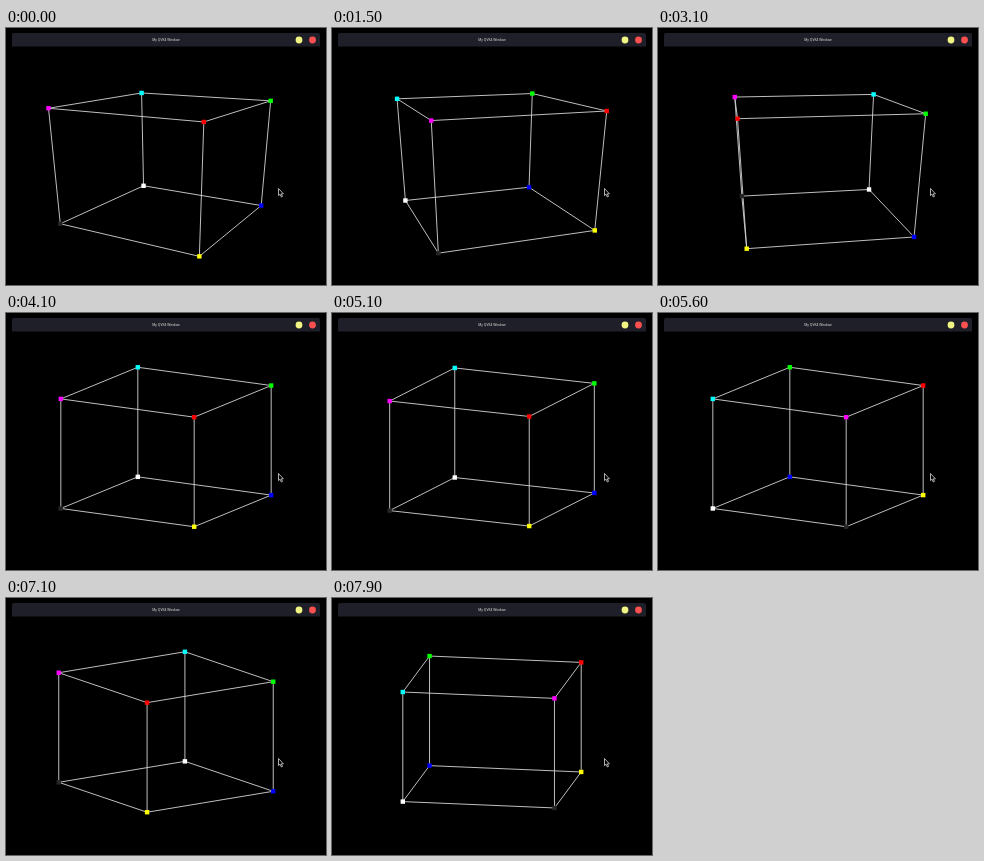
Animation of 320 by 257 pixels, one loop 8 s. Source, as an HTML page:

```html
<!DOCTYPE html>
<html lang="en">
<head>
<meta charset="utf-8">
<title>Rotating cube</title>
<style>
  html, body { margin: 0; width: 100%; height: 100%; overflow: hidden; background: #000; }
  svg { display: block; width: 100%; height: 100%; }
  text { font: 3.3px "Noto Sans", "Open Sans", sans-serif; fill: #e4e4e0; text-anchor: middle; }
</style>
</head>
<body>
<svg viewBox="0 0 320 257">
  <path d="M6 18.5V7q0-2 2-2H312q2 0 2 2V18.5z" fill="#1f1f29"/>
  <text x="160" y="13.2">My QVK4 Window</text>
  <circle cx="293" cy="12" r="3.4" fill="#f1f584"/>
  <circle cx="306.5" cy="12" r="3.4" fill="#ff5050"/>
  <path id="edges" fill="none" stroke="#d4d4d4" stroke-width=".9"/>
  <g id="corners"></g>
  <path d="M272.5 160.5V167.6L274.1 166.2L275.3 169L276.5 168.4L275.3 165.8H277.4z"
        fill="#000" stroke="#d8d8d8" stroke-width=".8"/>
</svg>
<script>
const LOOP = 8000, TICK = 100;
const ORTHO_FROM = 4100;
const START_ANGLE = 75, STEP = 5;
const KEY_DELAY = 500, KEY_PERIOD = 30.3;
const HOLDS = [[753, 3400], [4603, LOOP]];

// Window centre and half size; the camera sits at (0, 1, 3) and looks at the origin.
const CX = 160, CY = 134, HALF_W = 154, HALF_H = 115.5;
const DIST = Math.sqrt(10), SIN = 1 / DIST, COS = 3 / DIST;

// Top ring, then bottom ring.
const COLORS = ['#ff0000', '#ff00ff', '#00ffff', '#00ff00',
                '#ffff00', '#262626', '#ffffff', '#0000ff'];
const SIZE = 4.4;

const edges = document.getElementById('edges');
const corners = document.getElementById('corners');
const dots = COLORS.map(color => {
  const dot = document.createElementNS('http://www.w3.org/2000/svg', 'rect');
  dot.setAttribute('width', SIZE);
  dot.setAttribute('height', SIZE);
  dot.setAttribute('fill', color);
  return corners.appendChild(dot);
});

// A held key fires once, then repeats after a delay.
function keyEvents(t, [press, release]) {
  const held = Math.min(t, release) - press;
  if (held < 0) return 0;
  return held < KEY_DELAY ? 1 : 2 + Math.floor((held - KEY_DELAY) / KEY_PERIOD);
}

function project(i, angle, ortho) {
  const a = (angle + (i % 4) * 90) * Math.PI / 180;
  const x = Math.SQRT1_2 * Math.cos(a);
  const z = Math.SQRT1_2 * Math.sin(a);
  const y = i < 4 ? 0.5 : -0.5;
  const scale = ortho ? 1 : DIST / (DIST - y * SIN - z * COS);
  return [CX + HALF_W * x * scale, CY - HALF_H * (y * COS - z * SIN) * scale];
}

function draw(t) {
  const events = HOLDS.reduce((sum, hold) => sum + keyEvents(t, hold), 0);
  const angle = START_ANGLE - STEP * events;
  const points = COLORS.map((_, i) => project(i, angle, t >= ORTHO_FROM));
  const line = (a, b) => `M${points[a]}L${points[b]}`;
  let d = '';
  for (let i = 0; i < 4; i++) {
    const next = (i + 1) % 4;
    d += line(i, next) + line(i + 4, next + 4) + line(i, i + 4);
  }
  edges.setAttribute('d', d);
  points.forEach(([x, y], i) => {
    dots[i].setAttribute('x', x - SIZE / 2);
    dots[i].setAttribute('y', y - SIZE / 2);
  });
}

const start = performance.now();
function frame() {
  const t = (performance.now() - start) % LOOP;
  draw(Math.floor(t / TICK) * TICK);
  requestAnimationFrame(frame);
}
draw(0);
requestAnimationFrame(frame);
</script>
</body>
</html>
```
